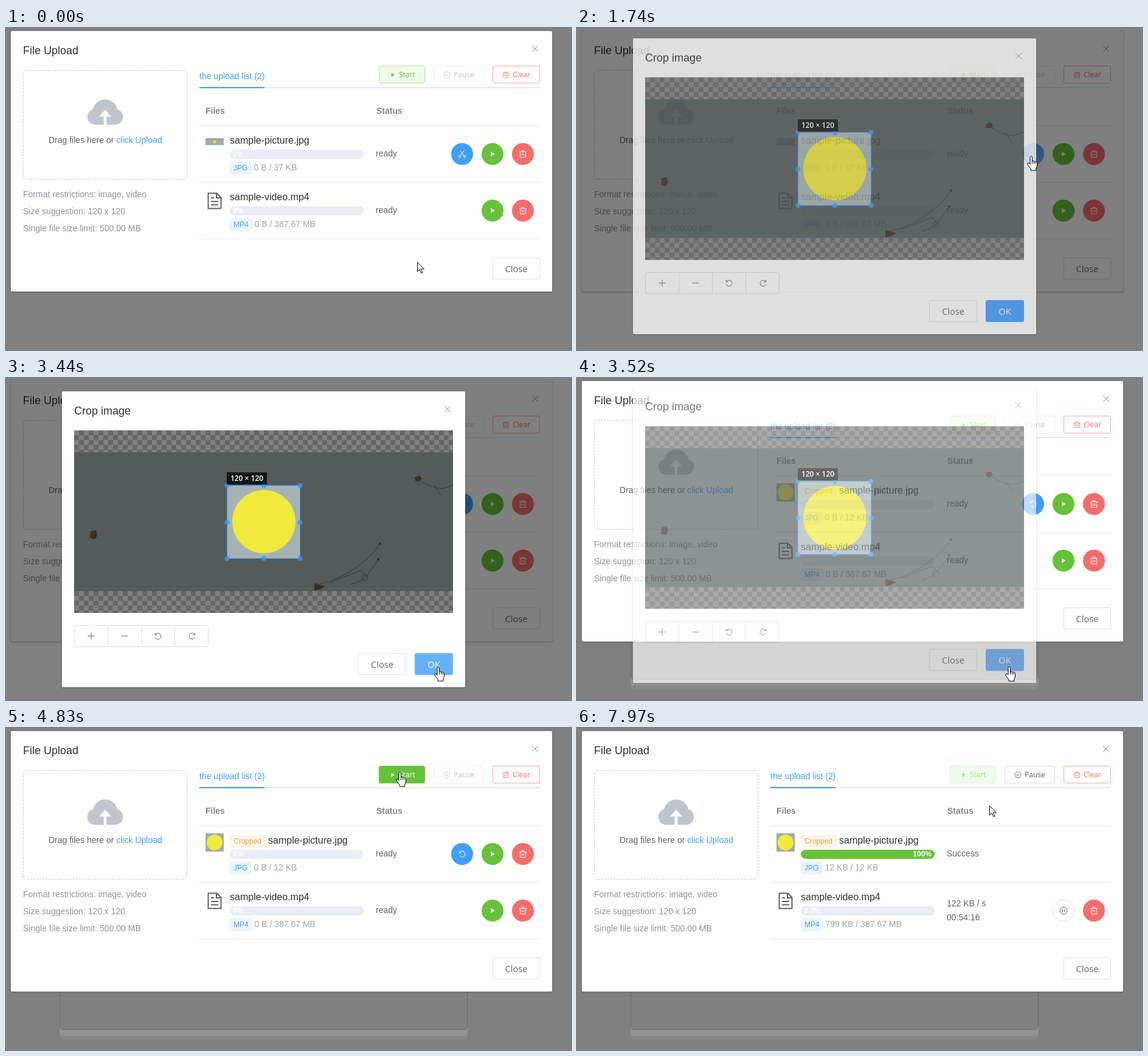
An HTML page that plays this animation: 929 px wide and 529 px high, repeating every 8000 ms.

```html
<!DOCTYPE html>
<html lang="en">
<head>
<meta charset="utf-8">
<title>File Upload</title>
<style>
html, body { margin: 0; width: 100%; height: 100%; overflow: hidden; background: #808080; }
body { position: relative; font: 14px/20px "Liberation Sans", Arial, sans-serif; color: #606266; }
div, span.t, b.t { position: absolute; box-sizing: border-box; white-space: nowrap; }
svg { fill: none; stroke: currentColor; stroke-width: 1; overflow: visible; display: block; }
.solid { fill: currentColor; stroke: none; }
.defs { position: absolute; width: 0; height: 0; }

.dialog { left: 8px; top: 5px; width: 890px; height: 428px; }
.panel { background: #fff; border-radius: 2px; box-shadow: 0 1px 3px rgba(0,0,0,.3); }
.title { font-size: 18px; line-height: 24px; color: #303133; }
.x { color: #909399; }
.drop { left: 20px; top: 64px; width: 270px; height: 180px; border: 1px dashed #c4c6cc; border-radius: 6px; }
.link { color: #409eff; }
.hint { color: #909399; left: 20px; }
.line { left: 310px; width: 560px; height: 1px; background: #e6e8ee; }
b.t { color: #84878d; }

.btn { border: 1px solid #dcdfe6; border-radius: 3px; background: #fff; text-align: center;
  font: 14.6px/34px "Open Sans", "Noto Sans", sans-serif; height: 36px; }
.small { height: 29px; font-size: 12px; line-height: 27px; font-weight: 500; top: 57px; }
.small svg { position: absolute; top: 8px; }
.small span { position: absolute; left: 32px; }
.start { left: 605px; width: 76px; animation: start 8s step-end infinite; }
.pause { left: 695px; width: 83px; animation: pause 8s step-end infinite; }
.clear { left: 792px; width: 78px; color: #f56c6c; border-color: #f9a7a7; }

.row { left: 310px; width: 560px; height: 93px; }
.name { left: 50px; top: 14px; font-size: 16px; color: #303133; }
.track { left: 50px; top: 39px; width: 220px; height: 15px; border-radius: 8px; background: #e9ecf4; overflow: hidden; }
.fill { left: 0; top: 0; width: 0; height: 15px; border-radius: 8px; text-align: right;
  font: bold 12px/15px "Liberation Sans", Arial, sans-serif; color: #fff; }
.fill span { margin: 0 5px; }
.green { background: #67c23a; animation: fill 8s infinite; }
.tag { height: 20px; padding: 0 5px; border: 1px solid #d9ecff; border-radius: 4px; background: #ecf5ff;
  font-size: 12px; line-height: 18px; color: #409eff; }
.warm { background: #fdf6ec; border-color: #faecd8; color: #e6a23c; left: 50px; top: 15px; }
.size { top: 58px; color: #a0a2a6; }
.state { left: 290px; top: 0; height: 91px; line-height: 23px; display: flex; align-items: center; white-space: pre; }

.round { width: 36px; height: 36px; top: 28px; border-radius: 50%; color: #fff; display: flex; align-items: center; justify-content: center; }
.blue { left: 414px; animation: blue 8s step-end infinite; }
.go { left: 464px; background: #67c23a; }
.hold { left: 464px; background: #fff; border: 1px solid #dcdfe6; color: #606266; visibility: hidden; }
.del { left: 514px; background: #f56c6c; }

.cropped-only, .undo, .cropped .raw, .cropped .cut, .busy .blue, .busy .go, .done .first .round { display: none; }
.cropped .cropped-only, .cropped .undo { display: block; }
.cropped .first .name { left: 113px; }
.busy .hold { visibility: visible; }

.dim { inset: 0; z-index: 1; background: rgba(0,0,0,.5); animation: dim 8s step-end infinite; }
.crop { left: 92px; top: 22px; width: 663px; height: 486px; z-index: 3; animation: crop 8s infinite; }
.canvas { left: 20px; top: 64px; width: 623px; height: 300px;
  background: repeating-conic-gradient(#666 0 25%, #808080 0 50%) 0 0 / 16px 16px; }
.badge { left: 251px; top: 69px; width: 66px; height: 20px; background: #151717; color: #fff; text-align: center;
  font: 600 12px/20px "Open Sans", "Noto Sans", sans-serif; }
.tools { left: 20px; top: 384px; width: 221px; height: 36px; border: 1px solid #dcdfe6; border-radius: 4px; display: flex; }
.tools i { flex: none; width: 55px; border-right: 1px solid #dcdfe6; display: grid; place-items: center; box-sizing: border-box; }
.tools i:last-child { border: 0; }
.ok { left: 580px; top: 430px; width: 63px; border: 0; line-height: 36px; color: #fff; animation: ok 8s step-end infinite; }

.trail { left: 88px; top: 420px; width: 671px; height: 92px; background: #878787; border-radius: 6px; animation: trail 8s step-end infinite; }
.trail div { left: 0; top: 0; width: 671px; height: 86px; background: #929292; border-radius: 6px; }
.trail div div { height: 76px; background: #808080; border: 1px solid #6c6c6c; }

.cursor { left: 0; top: 0; z-index: 4; animation: move 8s linear infinite; }
.cursor svg { position: absolute; top: 0; left: 0; fill: #fff; stroke: #000; }
.cursor .hand { left: -6px; animation: hand 8s step-end infinite; }
.arrow { animation: arrow 8s step-end infinite; }

@keyframes move {
  0%, .9% { transform: translate(676px, 384px); animation-timing-function: ease-in-out; }
  10% { transform: translate(742px, 228px); }
  12.8% { transform: translate(742px, 223px); }
  13.7% { transform: translate(746px, 211px); }
  15.8%, 26% { transform: translate(746px, 210px); animation-timing-function: ease-in-out; }
  33.3%, 48.4% { transform: translate(710px, 474px); animation-timing-function: ease-in-out; }
  58.4% { transform: translate(655px, 95px); }
  59.5% { transform: translate(650px, 82px); }
  60.3%, 98% { transform: translate(647px, 72px); }
  99.5%, 100% { transform: translate(678px, 127px); }
}
@keyframes hand {
  0%, 26.5%, 49%, 98.4%, 100% { visibility: hidden; }
  12.8%, 32.8%, 59.5% { visibility: visible; }
}
@keyframes arrow {
  0%, 26.5%, 49%, 98.4%, 100% { visibility: visible; }
  12.8%, 32.8%, 59.5% { visibility: hidden; }
}
@keyframes crop {
  0%, 20.06% { opacity: 0; transform: translateY(-20px); animation-timing-function: ease; }
  23.81%, 43.19% { opacity: 1; transform: none; animation-timing-function: ease; }
  46.94%, 100% { opacity: 0; transform: translateY(-20px); }
}
@keyframes dim { 0%, 43.1%, 100% { opacity: 0; } 19.87% { opacity: 1; } }
@keyframes blue { 0%, 27%, 100% { background: #409eff; } 12.87% { background: #66b1ff; } 18.87% { background: #3a8ee6; } 19.87% { background: #66b1ff; } }
@keyframes ok { 0%, 49%, 100% { background: #409eff; } 32.8% { background: #66b1ff; } 40.37% { background: #3a8ee6; } 41.5% { background: #66b1ff; } }
@keyframes start {
  0%, 100% { background: #f0f9eb; border-color: #b8e2a4; color: #67c23a; }
  59.6% { background: #67c23a; border-color: #67c23a; color: #fff; }
  69.1% { background: #f0f9eb; border-color: #e1f3d8; color: #a4da89; }
}
@keyframes pause {
  0%, 100% { border-color: #ebeef5; color: #c0c4cc; }
  69.1% { border-color: #dcdfe6; color: #606266; }
}
@keyframes fill {
  0%, 76.8% { width: 0; }
  84.3%, 86% { width: 99%; }
  92%, 100% { width: 100%; }
}
@keyframes trail { 0%, 100% { opacity: 0; } 43.2% { opacity: 1; } }
</style>
</head>
<body>
<svg class="defs">
  <symbol id="play" viewBox="0 0 14 14"><path class="solid" d="M4.3 3 10.3 7l-6 4z"/></symbol>
  <symbol id="hold" viewBox="0 0 14 14"><circle cx="7" cy="7" r="5.8"/><path d="M5.5 4.7v4.6M8.5 4.7v4.6"/></symbol>
  <symbol id="trash" viewBox="0 0 14 14"><path d="M1 3.5h12M5 3.5v-2h4v2M2.6 3.5v9h8.8v-9M5.6 6v4M8.4 6v4"/></symbol>
  <symbol id="cut" viewBox="0 0 14 14"><circle cx="3" cy="10.8" r="1.8"/><circle cx="11" cy="10.8" r="1.8"/><path d="M4 9.3 10.3 1.3M10 9.3 3.7 1.3"/></symbol>
  <symbol id="back" viewBox="0 0 14 14"><path d="M2.6 5A4.9 4.9 0 1 1 2.4 9M2.3 1.8V5h3.3"/></symbol>
  <symbol id="plus" viewBox="0 0 14 14"><path d="M1.5 7h11M7 1.5v11"/></symbol>
  <symbol id="minus" viewBox="0 0 14 14"><path d="M1.5 7h11"/></symbol>
  <symbol id="cross" viewBox="0 0 14 14"><path d="m2 2 10 10M12 2 2 12"/></symbol>
</svg>

<div class="trail"><div><div></div></div></div>

<div class="dialog panel" id="app">
  <span class="t title" style="left:20px;top:20px">File Upload</span>
  <div class="x" style="left:855px;top:22px"><svg width="14" height="14"><use href="#cross"/></svg></div>

  <div class="drop">
    <svg width="60" height="45" style="position:absolute;left:104px;top:44px">
      <path fill="#c0c4cc" stroke="none" d="M13 45A13 13 0 0 1 10 19.500 20.500 20.500 0 0 1 50 19.500 13 13 0 0 1 47 45Z"/>
      <path fill="#fff" stroke="none" d="m30 20 10 11.500h-7.700V45h-4.600V31.500H20z"/>
    </svg>
    <span class="t" style="left:41px;top:104px">Drag files here or <span class="link">click Upload</span></span>
  </div>
  <span class="t hint" style="top:258px">Format restrictions: image, video</span>
  <span class="t hint" style="top:286px">Size suggestion: 120 x 120</span>
  <span class="t hint" style="top:314px">Single file size limit: 500.00 MB</span>

  <span class="t link" style="left:310px;top:64px">the upload list (2)</span>
  <div class="line" style="top:92px;height:2px;background:#e4e7ed"></div>
  <div style="left:310px;top:92px;width:107px;height:2px;background:#409eff"></div>

  <div class="btn small start"><svg width="12" height="12" style="left:16px"><use href="#play"/></svg><span>Start</span></div>
  <div class="btn small pause"><svg width="12" height="12" style="left:15px"><use href="#hold"/></svg><span>Pause</span></div>
  <div class="btn small clear"><svg width="12" height="12" style="left:15px"><use href="#trash"/></svg><span>Clear</span></div>

  <b class="t" style="left:320px;top:121px">Files</b>
  <b class="t" style="left:601px;top:121px">Status</b>
  <div class="line" style="top:155px"></div>
  <div class="line" style="top:248px"></div>
  <div class="line" style="top:341px"></div>

  <div class="row first" style="top:156px">
    <svg class="raw" width="30" height="12" style="position:absolute;left:10px;top:20px">
      <path fill="#9fabab" stroke="none" d="M0 0h30v11.500H0z"/><circle cx="15" cy="6" r="2.600" fill="#e8de33" stroke="none"/>
    </svg>
    <svg class="cropped-only" width="30" height="30" style="position:absolute;left:10px;top:12px">
      <path fill="#a0abad" stroke="none" d="M0 0h30v30H0z"/><circle cx="15" cy="15" r="13" fill="#f1e93b" stroke="none"/>
    </svg>
    <div class="tag warm cropped-only">Cropped</div>
    <span class="t name">sample-picture.jpg</span>
    <div class="track"><div class="fill green"><span id="label1"></span></div></div>
    <div class="tag" style="left:50px;top:59px">JPG</div>
    <span class="t size" id="size1" style="left:89.500px"></span>
    <div class="state" id="state1"></div>
    <div class="round blue">
      <svg class="cut" width="14" height="14"><use href="#cut"/></svg>
      <svg class="undo" width="14" height="14"><use href="#back"/></svg>
    </div>
    <div class="round go"><svg width="14" height="14"><use href="#play"/></svg></div>
    <div class="round hold"><svg width="14" height="14"><use href="#hold"/></svg></div>
    <div class="round del"><svg width="14" height="14"><use href="#trash"/></svg></div>
  </div>

  <div class="row" style="top:249px">
    <svg width="24" height="28" style="position:absolute;left:13px;top:16px;stroke-width:2">
      <path d="M1.500 1.500h14l7 7v18h-21zM15 1.500V9h7.500M6 9h5M6 15h12M6 20.500h12"/>
    </svg>
    <span class="t name">sample-video.mp4</span>
    <div class="track"><div class="fill"><span id="label2"></span></div></div>
    <div class="tag" style="left:50px;top:59px">MP4</div>
    <span class="t size" id="size2" style="left:90.500px"></span>
    <div class="state" id="state2"></div>
    <div class="round go"><svg width="14" height="14"><use href="#play"/></svg></div>
    <div class="round hold"><svg width="14" height="14"><use href="#hold"/></svg></div>
    <div class="round del"><svg width="14" height="14"><use href="#trash"/></svg></div>
  </div>

  <div class="btn" style="left:792px;top:372px;width:78px">Close</div>
  <div class="dim"></div>
</div>

<div class="crop panel">
  <span class="t title" style="left:20px;top:20px">Crop image</span>
  <div class="x" style="left:627px;top:22px"><svg width="14" height="14"><use href="#cross"/></svg></div>
  <div class="canvas">
    <svg width="623" height="300">
      <path fill="#535b5b" stroke="none" d="M0 36h623v228H0z"/>
      <g stroke="#363938">
        <path d="M568 81q16 13 38 15l17-6M592 90l11 17M403 253q38-10 65-31 23-17 35-36M455 253q18-5 25-13l21-28M420 250l52-20M480 240l-8-10"/>
        <circle cx="478" cy="242" r="5"/>
      </g>
      <g fill="#3a2d26" stroke="none">
        <path d="m27 166 9-2 2 9-4 6-8-2zM560 77l8-3 4 5-5 5-6-1zM395 251l18 5-8 5-10 2z"/>
        <circle cx="503" cy="186" r="2"/><circle cx="500" cy="212" r="2"/>
      </g>
      <path fill="#a6b3b4" stroke="#39f" d="M251.500 90.500h120v120h-120z"/>
      <circle cx="312" cy="150" r="52" fill="#f1e93b" stroke="none"/>
      <path stroke="#39f" stroke-opacity=".8" stroke-width="8" stroke-linecap="round"
        d="M251.500 90.500h0M312 90.500h0M371.500 90.500h0M251.500 151h0M371.500 151h0M251.500 210.500h0M312 210.500h0M371.500 210.500h0"/>
    </svg>
    <div class="badge">120 × 120</div>
  </div>
  <div class="tools">
    <i><svg width="14" height="14"><use href="#plus"/></svg></i>
    <i><svg width="14" height="14"><use href="#minus"/></svg></i>
    <i><svg width="14" height="14"><use href="#back"/></svg></i>
    <i><svg width="14" height="14" style="transform:scaleX(-1)"><use href="#back"/></svg></i>
  </div>
  <div class="btn" style="left:487px;top:430px;width:79px">Close</div>
  <div class="btn ok">OK</div>
</div>

<div class="cursor">
  <svg class="arrow" width="13" height="20"><path d="M.5.8v15.400l3.600-3.400 2.700 6 2.200-1-2.600-5.800h5z"/></svg>
  <svg class="hand" width="18" height="25"><path d="M5 14V2.200a1.700 1.700 0 0 1 3.400 0V9c.5-1 2.700-.9 3 .4.6-.9 2.500-.7 2.700.6.9-.6 2.400 0 2.400 1.400V16c0 2.400-1.400 3.600-1.800 5.200v2.800H6.200v-2.400C5 19.800 2.500 17 .9 14 .2 12.400 1.600 11 3 12zM8.400 9v4M11.400 9.500V13M14.100 10.500V13"/></svg>
</div>

<script>
const LOOP = 8000;
const steps = [
  [0, { mode: '', label1: '0%', size1: '0 B / 37 KB', state1: 'ready',
        label2: '0%', size2: '0 B / 387.67 MB', state2: 'ready' }],
  [3380, { mode: 'cropped', size1: '0 B / 12 KB' }],
  [5530, { mode: 'cropped busy', state1: '0 B / s\n-', state2: '0 B / s\n-' }],
  [6150, { label1: '99%', size1: '12 KB / 12 KB', state1: '466 B / s\n-',
           label2: '0.02%', size2: '80 KB / 387.67 MB', state2: '215 B / s\n523:59:00' }],
  [6880, { mode: 'cropped busy done', label1: '100%', state1: 'Success' }],
  [7150, { label2: '0.11%', size2: '440 KB / 387.67 MB', state2: '95 KB / s\n01:09:34' }],
  [7880, { label2: '0.2%', size2: '799 KB / 387.67 MB', state2: '122 KB / s\n00:54:16' }]
];
const app = document.getElementById('app');
// Share the clock of the CSS animations.
const clock = document.querySelector('.cursor').getAnimations()[0];
let shown = 0;

function show(count) {
  const { mode, ...texts } = Object.assign({}, ...steps.slice(0, count).map(s => s[1]));
  app.className = 'dialog panel ' + mode;
  for (const id in texts) document.getElementById(id).textContent = texts[id];
}

function tick() {
  const t = (clock ? clock.currentTime || 0 : performance.now()) % LOOP;
  const count = Math.max(1, steps.filter(([at]) => at <= t).length);
  if (count !== shown) show(shown = count);
  requestAnimationFrame(tick);
}
tick();
</script>
</body>
</html>
```
